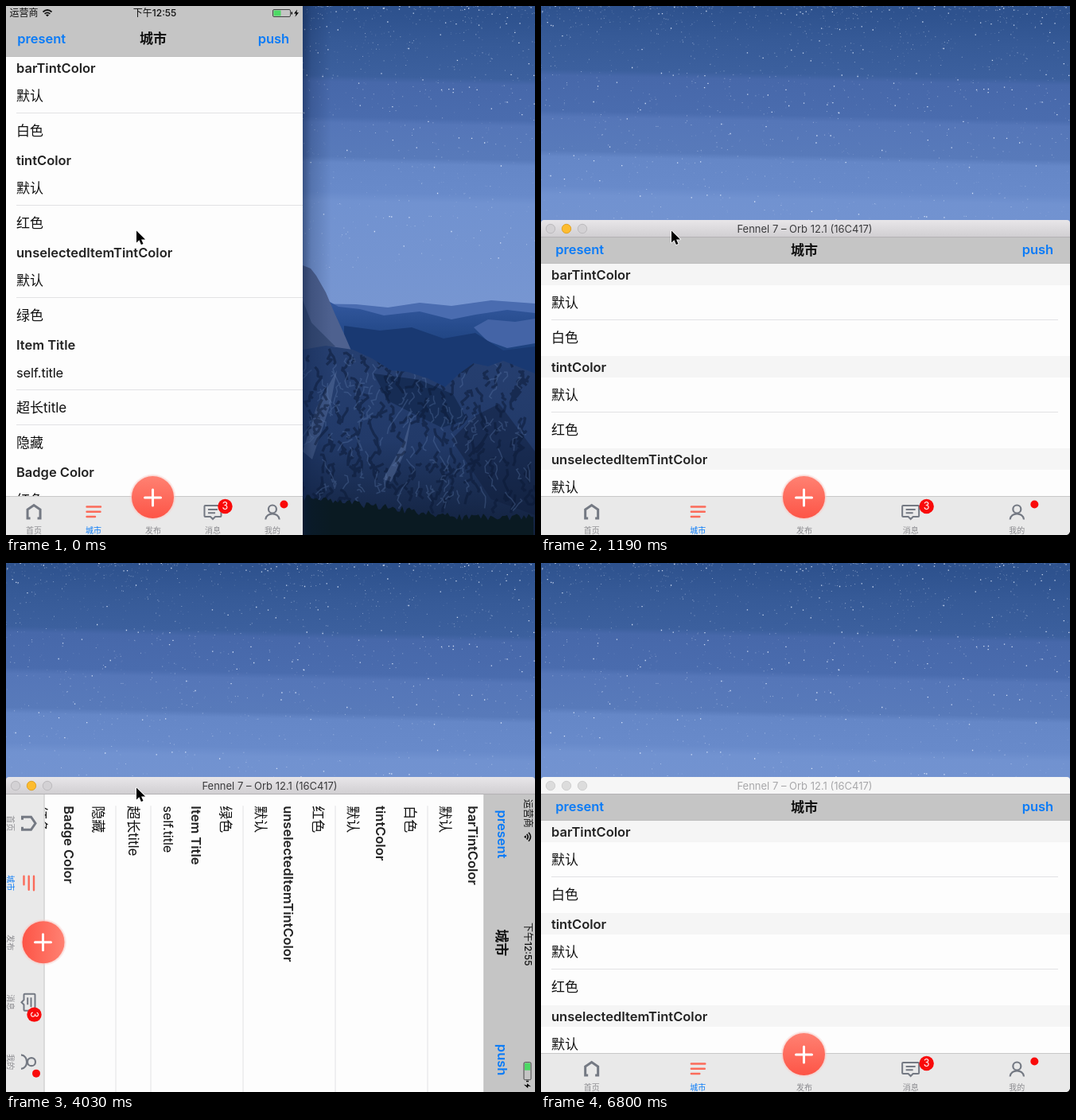
An HTML page that plays this animation: 665x665 px, repeating every 6900 ms.

```html
<!DOCTYPE html>
<html lang="zh-CN">
<head>
<meta charset="utf-8">
<title>Rotation demo</title>
<style>
html, body { margin: 0; width: 100%; height: 100%; overflow: hidden; background: #000; }
svg { display: block; width: 100vw; height: 100vh; }
text { font: 400 17px Inter, "Noto Sans CJK SC", "Noto Sans CJK", sans-serif; fill: #111; }
.latin { font-size: 16.5px; letter-spacing: -.01em; }
.bold { font-weight: 600; }
.latin.bold { letter-spacing: -.001em; }
.blue { fill: #0a7bf7; }
.small { font-size: 12px; }
.mid { text-anchor: middle; }
.end { text-anchor: end; }
.label { font-size: 10px; fill: #8b8b8f; }
.icon { fill: none; stroke: #747983; stroke-width: 2.2; }
</style>
</head>
<body>
<svg id="stage" viewBox="0 0 665 665" xmlns="http://www.w3.org/2000/svg">
  <defs>
    <linearGradient id="sky" gradientUnits="userSpaceOnUse" x1="0" y1="0" x2="0" y2="370" gradientTransform="rotate(1.1)">
      <stop offset="0" stop-color="#2e528e"/><stop offset=".1" stop-color="#365a97"/>
      <stop offset=".215" stop-color="#3c609e"/><stop offset=".235" stop-color="#4768aa"/>
      <stop offset=".355" stop-color="#4a6cae"/><stop offset=".375" stop-color="#5576b8"/>
      <stop offset=".49" stop-color="#587aba"/><stop offset=".51" stop-color="#6587c7"/>
      <stop offset=".61" stop-color="#688aca"/><stop offset=".64" stop-color="#7192d0"/>
      <stop offset="1" stop-color="#7796d1"/>
    </linearGradient>
    <linearGradient id="rock" x1="0" y1="0" x2="0" y2="1">
      <stop offset="0" stop-color="#263f70"/><stop offset=".5" stop-color="#223a69"/><stop offset="1" stop-color="#12213d"/>
    </linearGradient>
    <linearGradient id="hills" x1="0" y1="0" x2="0" y2="1">
      <stop offset="0" stop-color="#3459a0"/><stop offset=".4" stop-color="#204583"/><stop offset="1" stop-color="#143062"/>
    </linearGradient>
    <linearGradient id="shade">
      <stop offset="0" stop-color="#0a1c40" stop-opacity=".5"/><stop offset=".3" stop-color="#0a1c40" stop-opacity=".2"/>
      <stop offset="1" stop-color="#0a1c40" stop-opacity="0"/>
    </linearGradient>
    <linearGradient id="coral" x1="0" y1="0" x2="0" y2="1">
      <stop offset="0" stop-color="#ff8172"/><stop offset="1" stop-color="#fd5547"/>
    </linearGradient>
    <linearGradient id="chrome" x1="0" y1="0" x2="0" y2="1">
      <stop offset="0" stop-color="#e8e6e9"/><stop offset="1" stop-color="#d0ced1"/>
    </linearGradient>
    <clipPath id="cliff"><path id="cliffShape" d="M373 432L402 427 436 432 460 443 484 458 505 460 530 468 552 479 570 462 588 449 606 453 625 446 665 462V665H373Z"/></clipPath>
    <clipPath id="window"><rect id="windowBox"/></clipPath>
    <clipPath id="listClip"><rect id="listBox" x="-3"/></clipPath>
  </defs>

  <rect width="665" height="665" fill="url(#sky)"/>
  <g id="stars" fill="none" stroke="#e6efff"></g>
  <g id="land">
    <path d="M373 374L440 375 480 379 520 373 560 377 610 370 665 374V430H373Z" fill="#4a6cb0"/>
    <path d="M400 368L418 378 445 381 475 389 520 384 560 394 590 388 630 382 665 386V500H400Z" fill="url(#hills)"/>
    <path d="M588 404L606 394 640 397 665 393V424L630 430 605 421Z" fill="#4464a6"/>
    <path d="M425 402L470 408 510 404 550 418 590 411 625 433 665 428V490H425Z" fill="#193972"/>
    <path d="M373 326L383 330 390 339 402 360 413 386 424 410 434 433 373 436Z" fill="#4e618f"/>
    <path d="M373 370L384 398 398 412 414 428 373 434Z" fill="#2f446c" opacity=".75"/>
    <use href="#cliffShape" fill="url(#rock)"/>
    <g clip-path="url(#cliff)" id="texture" fill="none" stroke-linejoin="round">
      <path d="M462 462L520 470 562 488 580 520 548 530 515 514 480 496Z" fill="#12274d" opacity=".75"/>
      <path d="M373 560L390 505 416 458 408 500 385 570ZM474 595L500 548 510 515 502 560 484 598Z" fill="#6f88b5" opacity=".35"/>
      <path d="M560 545L590 515 620 500 665 560V640L610 620Z" fill="#101f3c" opacity=".5"/>
    </g>
    <path id="trees" fill="#0a1a22"/>
    <rect x="373" width="36" height="665" fill="url(#shade)"/>
  </g>

  <g clip-path="url(#window)">
    <rect width="665" height="665"/>
    <g id="screen"></g>
  </g>

  <g id="titleBar">
    <path id="barShape" d="M0 291V273Q0 269 4 269H661Q665 269 665 273V291Z"/>
    <path d="M0 290.5H665" stroke="#b4b2b5"/>
    <g id="dots" stroke-width="1"></g>
    <text id="barText" class="mid" style="font-size:13px" x="331.5" y="285">Fennel 7 – Orb 12.1 (16C417)</text>
  </g>
  <path id="corner" d="M665 661V665H661Q664 664 665 661Z"/>
  <path id="cursor" d="M.5 .5V15.5L4 12.3 6.4 18 9 16.9 6.6 11.4H11.6Z" stroke="#fff" stroke-width="1.6" paint-order="stroke" stroke-linejoin="round"/>
</svg>
<script>
const $ = id => document.getElementById(id);
const set = (node, attrs) => { for (const k in attrs) node.setAttribute(k, attrs[k]); return node; };
const add = (parent, tag, attrs = {}, text) => {
  const node = set(document.createElementNS("http://www.w3.org/2000/svg", tag), attrs);
  if (text) node.textContent = text;
  return parent.appendChild(node);
};
const lerp = (a, b, p) => a + (b - a) * p;
const LOOP = 6900;

let seed = 11;
const rnd = () => (seed = seed * 16807 % 2147483647) / 2147483647;

function drawScenery() {
  for (const [count, opacity, size] of [[1100, .2, .9], [560, .45, 1], [170, .85, 1.3]]) {
    let d = "";
    for (let i = 0; i < count; i++)
      d += `M${(rnd() * 665).toFixed(1)} ${(rnd() ** 1.8 * 330).toFixed(1)}h${size}`;
    add($("stars"), "path", { d, opacity, "stroke-width": size });
  }
  // jagged veins running down the rock
  for (const [count, stroke, opacity, width] of [[200, "#0b1834", .5, 3.2], [150, "#6480b4", .3, 1.5]]) {
    let d = "";
    for (let i = 0; i < count; i++) {
      d += `M${(373 + rnd() * 292).toFixed(1)} ${(430 + rnd() * 190).toFixed(1)}`;
      for (let k = 0; k < 4; k++)
        d += `l${(rnd() * 11 - 6).toFixed(1)} ${(rnd() * 9 - 1).toFixed(1)}`;
    }
    add($("texture"), "path", { d, stroke, opacity, "stroke-width": width });
  }
  let d = "M373 665V616";
  for (let x = 375; x <= 665; x += 3)
    d += `L${x} ${(lerp(617, 642, Math.min(1, (x - 373) / 200)) + rnd() * 9 - 4).toFixed(1)}`;
  set($("trees"), { d: d + "V665Z" });
}

const sections = [
  [64, "barTintColor", "默认", "白色"],
  [180, "tintColor", "默认", "红色"],
  [296, "unselectedItemTintColor", "默认", "绿色"],
  [412, "Item Title", "self.title", "超长title", "隐藏"],
  [572, "Badge Color", "红色"]
];

const screen = $("screen");
const paper = add(screen, "rect", { x: -3, fill: "#fdfdfd" });
const list = add(add(screen, "g", { "clip-path": "url(#listClip)" }), "g");
const headers = [], rules = [];
for (const [top, name, ...rows] of sections) {
  headers.push(add(list, "rect", { x: -3, y: top, height: 27, fill: "#f5f5f5" }));
  add(list, "text", { x: 13, y: top + 19.5, class: "latin bold", style: "fill:#222" }, name);
  rows.forEach((row, i) => {
    const latin = /^[ -~]+$/.test(row);
    add(list, "text", { x: 13, y: top + 44 * i + 54.5 + (latin ? 0 : .5), class: latin ? "latin" : "" }, row);
    if (i) rules.push(add(list, "path", { stroke: "#e2e2e4", "data-y": top + 44 * i + 26.5 }));
  });
}

const nav = add(screen, "rect", { x: -3, y: -3, fill: "#c5c5c5" });
const navRule = add(screen, "path", { stroke: "#bfbfbf" });
const present = add(screen, "text", { class: "latin bold blue" }, "present");
const title = add(screen, "text", { class: "bold mid" }, "城市");
const push = add(screen, "text", { class: "latin bold blue end" }, "push");

const status = add(screen, "g");
add(status, "text", { x: 4.5, y: 13, class: "small" }, "运营商");
add(status, "path", { d: "M46.5 7.5Q52 2.5 57.5 7.5M48.6 9.8Q52 6.8 55.4 9.8", fill: "none", stroke: "#111", "stroke-width": 1.7 });
add(status, "path", { d: "M50 11.2Q52 9.6 54 11.2L52 13.3Z" });
const clock = add(status, "text", { y: 13, class: "small mid", style: "font-weight:500" }, "下午12:55");
const battery = add(status, "g");
add(battery, "rect", { x: 335.5, y: 4.5, width: 22, height: 9, rx: 1.5, fill: "none", stroke: "#444" });
add(battery, "rect", { x: 336.5, y: 5.5, width: 9, height: 7, fill: "#4cd964" });
add(battery, "path", { d: "M358.5 7.5h1.5v3h-1.5zM366 4.5l-4 5h2.6l-1.2 4.2 4.6-5.4h-2.7z" });

const tabBar = add(screen, "g");
const tabPaper = add(tabBar, "rect", { x: -3, y: 0, height: 54, fill: "#e9e9e9" });
const tabRule = add(tabBar, "path", { stroke: "#c8c8c8" });
const tabs = ["首页", "城市", "发布", "消息", "我的"].map((name, i) => {
  const tab = add(tabBar, "g");
  add(tab, "text", { y: 46.5, class: "label mid", style: i === 1 ? "fill:#0a7bf7" : "" }, name);
  return tab;
});
add(tabs[0], "path", { d: "M-4.5 28H-8V17L0 11.5 8 17V28H4.5", class: "icon", style: "stroke-width:3" });
add(tabs[1], "path", { d: "M-8.5 13.5H9M-8.5 19.8H8.5M-8.5 26H2", class: "icon", style: "stroke:#fb6b5a;stroke-width:2.4;stroke-linecap:round" });
const button = add(tabs[2], "g", { transform: "translate(-.5 1.5)" });
add(button, "circle", { r: 29, fill: "#f7cfca", opacity: .35 });
add(button, "circle", { r: 27.7, fill: "#fbc4bd", opacity: .5 });
add(button, "circle", { r: 26.5, fill: "url(#coral)" });
add(button, "path", { d: "M-10 .5H10M0 -9.5V10.5", stroke: "#fff", "stroke-width": 3, "stroke-linecap": "round" });
add(tabs[3], "path", { d: "M-9.5 12H9.5Q10.5 12 10.5 13V25Q10.5 26 9.5 26H3L0 29 -3 26H-9.5Q-10.5 26 -10.5 25V13Q-10.5 12 -9.5 12ZM-6 17H6M-6 21.3H3", class: "icon", style: "stroke-width:2" });
add(tabs[4], "circle", { cy: 16.5, r: 5, class: "icon" });
add(tabs[4], "path", { d: "M-8.7 29.5C-8 20 8 20 8.7 29.5", class: "icon" });
const count = add(tabs[3], "g");
add(count, "circle", { cy: 13, r: 9.2, fill: "#f90a0a" });
add(count, "text", { y: 17.4, class: "mid", style: "font-size:12.5px;fill:#fff" }, "3");
const dot = add(tabs[4], "circle", { cy: 10.5, r: 5, fill: "#f90a0a" });

const dots = [12, 32, 52].map(cx => add($("dots"), "circle", { cx, cy: 280, r: 5.7 }));

// p: 0 = upright layout, 1 = wide layout; bar: same for the navigation buttons
function layout(p, bar) {
  const w = lerp(373, 665, p), h = lerp(665, 374, p), navH = lerp(64, 33, p);
  const wide = { width: w + 6 };
  set(paper, { ...wide, y: -3, height: h + 6 });
  set($("listBox"), { ...wide, y: navH, height: h - 49 - navH });
  set(list, { transform: `translate(0 ${navH - 64})` });
  headers.forEach(r => set(r, wide));
  rules.forEach(r => set(r, { d: `M13 ${r.dataset.y}H${w + 2 - 17 * p}` }));
  set(nav, { ...wide, height: navH + 3 });
  set(navRule, { d: `M-3 ${navH - .5}h${w + 6}` });
  const base = lerp(47, 21.2, p);
  set(present, { x: lerp(14.3, 18.3, bar), y: base });
  set(push, { x: w - lerp(16.8, 20.8, bar), y: base });
  set(title, { x: w / 2 - 1.5, y: base + .3 });
  set(status, { opacity: 1 - p });
  set(clock, { x: w / 2 + .5 });
  set(battery, { transform: `translate(${w - 373} 0)` });
  set(tabBar, { transform: `translate(0 ${h - 49})` });
  set(tabPaper, wide);
  set(tabRule, { d: `M-3 .5h${w + 6}` });
  tabs.forEach((tab, i) => set(tab, { transform: `translate(${w / 2 - 1.5 + (i - 2) * w * .201} 0)` }));
  set(count, { transform: `translate(${lerp(15.5, 20, p)} 0)` });
  set(dot, { cx: lerp(14.5, 22, p) });
  return [w, h];
}

// [start ms, landscape window, layout progress, button progress]
const poses = [
  [0, 0, 0, 0],
  [750, 1, 0, 0], [890, 1, .3, 1], [1040, 1, .8, 1], [1190, 1, 1, 1],
  [2240, 0, 1, 1], [2380, 0, .45, 0], [2530, 0, 0, 0],
  [4030, 1, 0, 1], [4180, 1, .3, 1], [4330, 1, .8, 1], [4480, 1, 1, 1]
];
const pointer = [[0, 163.5, 282], [6130, 346, 490.5], [6280, 623, 619.5], [6430, 634, 647]];
const latest = (steps, t) => steps.filter(s => s[0] <= t).pop();
const show = (id, on) => set($(id), { visibility: on ? "visible" : "hidden" });

function render(t) {
  const [start, landscape, p, bar] = latest(poses, t);
  const [w, h] = layout(p, bar);
  const cx = landscape ? lerp(332, 332.5, p) : 186.5;
  const cy = landscape ? lerp(478.7, 478, p) : 332.5;
  const angle = landscape ? 90 * (1 - p) : -90 * p;
  set(screen, { transform: `translate(${cx} ${cy}) rotate(${angle}) translate(${-w / 2} ${-h / 2})` });
  set($("windowBox"), landscape ? { y: 291, width: 665, height: 374 } : { y: 0, width: 373, height: 665 });
  const settled = start > 0 && angle === 0;
  headers.forEach(r => set(r, { opacity: settled ? 1 : 0 }));

  show("land", !landscape);
  show("titleBar", landscape);
  show("corner", landscape && settled);
  const active = t < 6800;
  set($("barShape"), { fill: active ? "url(#chrome)" : "#f6f6f6" });
  $("barText").style.fill = active ? "#3b3b3d" : "#a8a8aa";
  dots.forEach((d, i) => {
    const yellow = active && i === 1;
    set(d, { fill: yellow ? "#fdbc2f" : active ? "#d3d1d4" : "#dcdcdc", stroke: yellow ? "#e0a32a" : active ? "#bdbbbe" : "#cfcfcf" });
  });

  const [, px, py] = latest(pointer, t);
  set($("cursor"), { transform: `translate(${px} ${py})` });
  show("cursor", t < 6570);
}

drawScenery();
const origin = performance.now();
function tick() {
  render((performance.now() - origin) % LOOP);
  requestAnimationFrame(tick);
}
tick();
</script>
</body>
</html>
```
